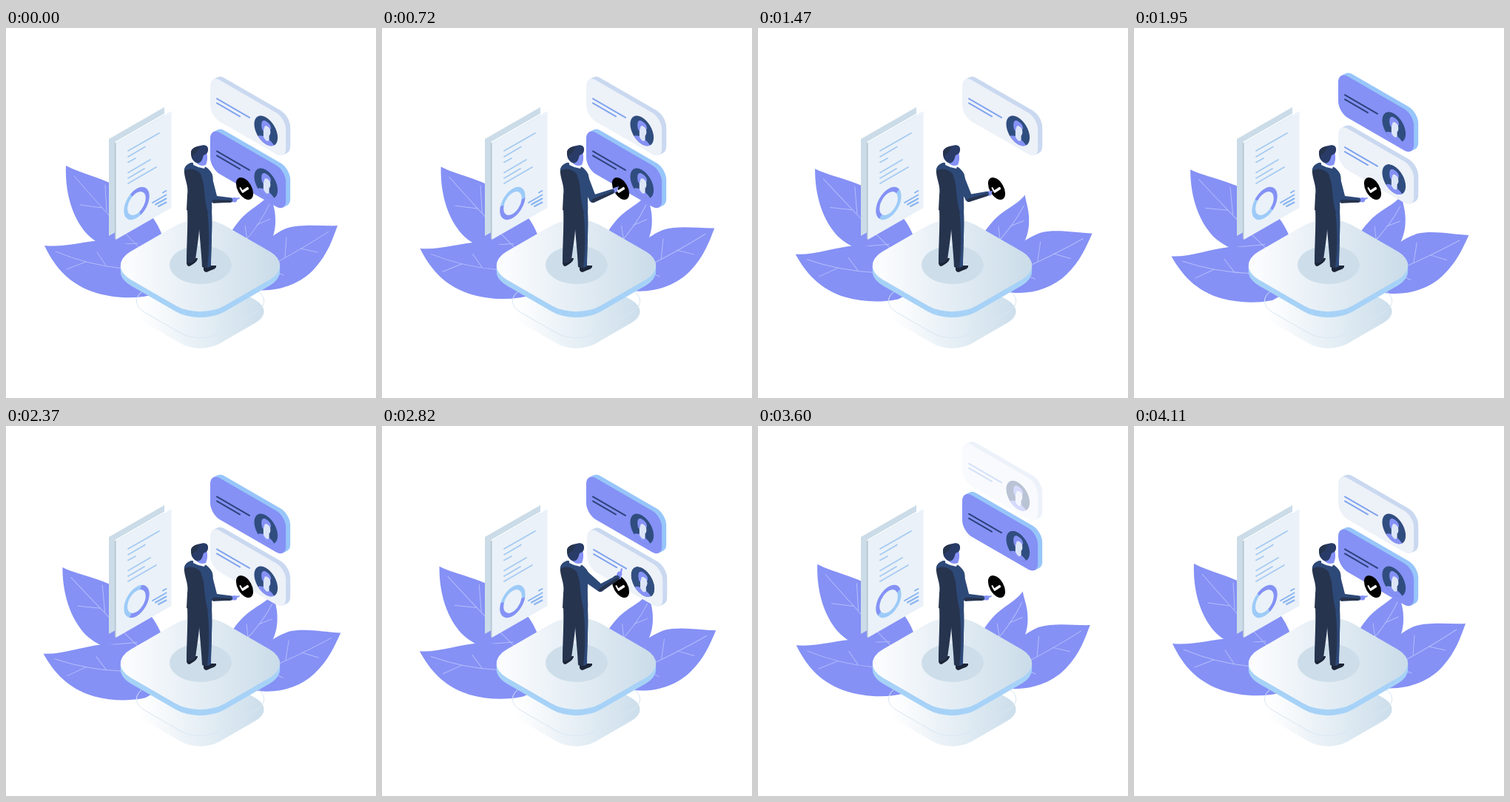
Write an HTML page with a canvas that moves like this. It is 500 px wide and 500 px high and loops after 4.14 s.

```html
<!DOCTYPE html>
<html lang="en">
<head>
<meta charset="utf-8">
<title>Profile choice</title>
<style>
html, body { margin: 0; width: 100%; height: 100%; overflow: hidden; background: #fff; }
canvas { display: block; width: 100vw; height: 100vh; }
</style>
</head>
<body>
<canvas id="stage"></canvas>
<script>
const LOOP = 4140, SWAP = 1857, COS = 0.866;
const PURPLE = '#8591f5', NAVY = '#27344e', BLUE = '#2d4978', SKY = '#a7d2f7';
const canvas = document.getElementById('stage');
const dpr = Math.max(1, window.devicePixelRatio || 1);
canvas.width = canvas.height = 500 * dpr;
const ctx = canvas.getContext('2d');

const ramp = (t, a, b) => Math.min(1, Math.max(0, (t - a) / (b - a)));
const ease = (t, a, b) => { const u = ramp(t, a, b); return u * u * (3 - 2 * u); };

function fill(c, d, color) {
  c.fillStyle = color;
  c.fill(new Path2D(d));
}
function stroke(c, d, color, width) {
  c.strokeStyle = color;
  c.lineWidth = width;
  c.lineCap = c.lineJoin = 'round';
  c.stroke(new Path2D(d));
}
function oval(c, x, y, rx, ry, color) {
  c.fillStyle = color;
  c.beginPath();
  c.ellipse(x, y, rx, ry, 0, 0, 7);
  c.fill();
}
// Draws on an upright isometric plane; dir sets which way it slopes.
function onWall(c, x, y, dir, draw) {
  c.save();
  c.transform(COS, dir * 0.5, 0, 1, x, y);
  draw();
  c.restore();
}

// Leaves: outline, veins, pivot and swing in radians
const leaves = [
  { x: 220, y: 320, swing: -0.037,
    shape: 'M81 186C105 199 140 203 172 228C197 249 212 272 216 300L180 312C150 303 117 293 102 269C85 244 80 213 81 186Z',
    veins: 'M92 200Q112 223 130 243Q155 272 182 299M100 239L130 243M140 293L178 291M134 212L136 248' },
  { x: 250, y: 322, swing: -0.073,
    shape: 'M52 294C78 297 104 288 132 287C160 287 190 300 214 324L204 359C178 367 145 366 116 356C81 343 64 319 52 294Z',
    veins: 'M67 302Q110 320 158 325M123 303L135 321M82 326L108 316' },
  { x: 300, y: 312, swing: 0.052,
    shape: 'M357 223C347 238 328 244 314 262C304 274 297 287 294 304L340 318C356 296 365 280 364 258C364 244 359 234 357 223Z',
    veins: 'M356 238Q343 266 318 294M323 267L326 286M339 266L357 258' },
  { x: 298, y: 325, swing: 0.086,
    shape: 'M448 267C426 268 400 264 378 271C352 283 336 302 322 322L336 354C368 357 398 346 417 325C435 305 441 286 448 267Z',
    veins: 'M436 275Q401 298 360 320M398 298L421 303M379 283L377 310M358 327L375 334' }
];
function drawLeaves(t) {
  const sway = (1 - Math.cos(2 * Math.PI * t / LOOP)) / 2;
  for (const leaf of leaves) {
    ctx.save();
    ctx.translate(leaf.x, leaf.y);
    ctx.rotate(leaf.swing * sway);
    ctx.translate(-leaf.x, -leaf.y);
    fill(ctx, leaf.shape, PURPLE);
    stroke(ctx, leaf.veins, '#b3bdfa', 1);
    ctx.restore();
  }
}

function tile(y, half, radius) {
  ctx.save();
  ctx.transform(COS, 0.5, -COS, 0.5, 262.5, y);
  ctx.beginPath();
  ctx.roundRect(-half, -half, 2 * half, 2 * half, radius);
  ctx.restore();
}
function shade(x0, x1, a, b) {
  const g = ctx.createLinearGradient(x0, 0, x1, 0);
  g.addColorStop(0, a);
  g.addColorStop(1, b);
  return g;
}
function drawPlatform() {
  tile(383, 58.5, 30);
  ctx.fillStyle = shade(180, 349, '#ffffff', '#ccdeeb');
  ctx.fill();
  tile(369, 58.5, 30);
  ctx.strokeStyle = '#d9e7f4';
  ctx.lineWidth = 1;
  ctx.stroke();
  ctx.fillStyle = SKY;
  for (let y = 329; y > 321; y--) {
    tile(y, 73.3, 38);
    ctx.fill();
  }
  tile(321, 73.3, 38);
  ctx.fillStyle = shade(165, 370, '#fbfcfe', '#cadce9');
  ctx.fill();
  oval(ctx, 263, 320, 42, 26, '#cddeea');
}

function drawPaper(t) {
  fill(ctx, 'M139 150L214 107V238L139 281Z', '#cbdce8');
  fill(ctx, 'M147 154L149 155V286L147 284.5Z', '#b3c2cf');
  fill(ctx, 'M148.5 155.5L223.5 112.5V243L148.5 286Z', '#eaf1f8');
  stroke(ctx, 'M148 154.5L222 112', '#fbfdff', 1.5);
  stroke(ctx, 'M165 166L207 142M165 174L188 160.5M165 181.5L175 176M165 195.5L195 178M165 203L187 190M165 210L203 188', '#a5caf3', 1.7);
  stroke(ctx, 'M212 222.5L216.5 220M198 236L216.5 225.5M202 238.5L216.5 230.5M206 241L216.5 235.5', '#88b4f0', 2);
  onWall(ctx, 176.5, 237, -1, () => {
    const mid = -0.42 + 4 * Math.PI * t / LOOP, span = 1.66;
    ctx.lineCap = 'butt';
    ctx.lineWidth = 5.5;
    for (const [a, b, color] of [[0, 7, '#9dcbf8'], [mid - span, mid + span, PURPLE]]) {
      ctx.beginPath();
      ctx.arc(0, 0, 17, a, b);
      ctx.strokeStyle = color;
      ctx.stroke();
    }
  });
}

// Cards are painted once, then moved and faded as a whole.
const CARD = { x: 272, y: 60, w: 116, h: 120, scale: 2 * dpr };
function makeCard(face, side, ink) {
  const layer = document.createElement('canvas');
  layer.width = CARD.w * CARD.scale;
  layer.height = CARD.h * CARD.scale;
  const c = layer.getContext('2d');
  c.scale(CARD.scale, CARD.scale);
  c.translate(-CARD.x, -CARD.y);
  const panel = (d, color) => onWall(c, 276 + d, 63 - d / 2, 1, () => {
    c.beginPath();
    c.roundRect(0, 0, 118, 56, 15);
    c.fillStyle = color;
    c.fill();
  });
  for (let d = 6; d > 0; d -= 0.5) panel(d, side);
  panel(0, face);
  stroke(c, 'M285 95.5L329 121M285 101.5L316 119.5', ink, 2);
  onWall(c, 351.3, 139, 1, () => {
    c.beginPath();
    c.arc(0, 0, 18.3, 0, 7);
    c.fillStyle = '#304d80';
    c.fill();
    c.clip();
    oval(c, 0, 20, 16, 11, PURPLE);
    fill(c, 'M-4 0H5V10Q1 16 -4 10Z', '#dbe5f7');
    oval(c, 1, -2, 6, 8, '#dbe5f7');
    fill(c, 'M-6 1C-9 -8 -5 -14 1 -13C7 -13 9 -9 7 -5C4 -8 0 -8 -2 -5L-4 2Z', PURPLE);
  });
  return layer;
}
const white = makeCard('#edf1f8', '#cad9f0', '#81a5ee');
const violet = makeCard(PURPLE, '#98c6fa', '#2c437c');

function putCard(card, dx, dy, alpha) {
  ctx.globalAlpha = alpha;
  ctx.drawImage(card, CARD.x + dx, CARD.y + dy, CARD.w, CARD.h);
  ctx.globalAlpha = 1;
}
function drawCards(t) {
  const first = t < 2030;
  const q = first ? t : t - SWAP;
  const [top, low] = first ? [white, violet] : [violet, white];
  const out = ease(q, 935, 1480);
  const dx = (first ? -140 : 140) * out;
  if (out < 1) putCard(low, dx, 71 + dx * 0.58, (1 - out) ** 1.5);
  putCard(top, 0, 71 * ease(q, 1568, 2028), 1);
  if (q > 1683) putCard(low, 0, -46 * (1 - ease(q, 1713, 2013)), ramp(q, 1683, 1863));
}

function drawBadge() {
  onWall(ctx, 322.5, 217, 1, () => {
    oval(ctx, 0, 0, 13.4, 13.4, '#000');
    stroke(ctx, 'M-6.5 3L-3.5 6L5 -3', '#fff', 3);
  });
}

// Arm poses: elbow, wrist and fingertip
const REST = [281, 231.5, 303, 232.5, 315, 230];
const TAP = [285, 231, 311, 221, 319, 215];
const LEFT = [285, 230, 309, 224, 316, 221];
const LIFT = [295, 219, 318, 205, 324, 193];
const poses = [[0, REST], [420, REST], [700, TAP], [1000, TAP], [1300, LEFT], [1480, LEFT], [1760, REST],
  [2420, REST], [2790, LIFT], [2900, LIFT], [3150, TAP], [3500, REST], [LOOP, REST]];
function armAt(t) {
  let i = 0;
  while (t >= poses[i + 1][0]) i++;
  const [a, from] = poses[i], [b, to] = poses[i + 1];
  const p = ease(t, a, b);
  return from.map((v, k) => v + (to[k] - v) * p);
}
function limb(x0, y0, r0, x1, y1, r1, color) {
  const a = Math.atan2(y1 - y0, x1 - x0) + Math.PI / 2;
  ctx.beginPath();
  ctx.arc(x0, y0, r0, a, a + Math.PI);
  ctx.arc(x1, y1, r1, a + Math.PI, a);
  ctx.fillStyle = color;
  ctx.fill();
}
function drawArm(t) {
  const [ex, ey, wx, wy, fx, fy] = armAt(t);
  limb(wx, wy, 2.5, wx + (fx - wx) * 0.5, wy + (fy - wy) * 0.5 + 1, 3.3, PURPLE);
  limb(wx + 3, wy, 2, fx, fy, 0.9, PURPLE);
  limb(271, 200, 7, ex, ey, 5, BLUE);
  limb(ex, ey, 5, wx, wy, 3.2, BLUE);
  limb(ex, ey + 2.6, 2.3, wx, wy + 1.6, 1.6, NAVY);
}

function drawMan() {
  fill(ctx, 'M244 317Q244 322 248 322L253 319Q259 315 259 311L255 311Z', '#1c2538');
  fill(ctx, 'M267 323Q266 330 271 330L278 327Q285 325 284 321L276 321Z', '#1c2538');
  fill(ctx, 'M245 244L263 246C262 272 259 292 256 313Q250 319 244 317C244 292 246 270 245 244Z', NAVY);
  fill(ctx, 'M260 246L278 246C279 274 277 300 277 322Q271 326 265 323C264 298 260 272 260 246Z', NAVY);
  fill(ctx, 'M272 248L278 246C279 274 277 300 277 322L272 324C275 298 275 272 272 248Z', BLUE);
  fill(ctx, 'M251 182C244 184 240 188 241 196C242 206 247 214 245 226L244 246Q253 250 262 250Q271 251 278 249C279 234 276 222 279 207C281 198 276 192 270 188Z', NAVY);
  fill(ctx, 'M251 182C244 184 241 188 241 193C249 188 259 191 264 199C269 211 267 230 273 250L278 249C279 234 276 222 279 207C281 198 276 192 270 188Z', BLUE);
  fill(ctx, 'M253 182L257 178L270 185L268 190Q260 189 253 185Z', '#f4f8fd');
  fill(ctx, 'M258 171L271 168C273 174 272 181 270 185Q263 188 257 182Z', PURPLE);
  fill(ctx, 'M250 170C249 163 256 160 263 159C269 157 274 160 273 165C273 169 270 171 267 172L265 178C262 184 257 183 254 180Q250 176 250 170Z', '#293c68');
  fill(ctx, 'M250 170C249 163 256 160 263 160C258 165 260 168 255 170Q251 173 252 177Z', NAVY);
}

function frame() {
  const t = performance.now() % LOOP;
  ctx.setTransform(dpr, 0, 0, dpr, 0, 0);
  ctx.fillStyle = '#fff';
  ctx.fillRect(0, 0, 500, 500);
  drawLeaves(t);
  drawPlatform();
  drawCards(t);
  drawPaper(t);
  drawMan();
  drawBadge();
  drawArm(t);
  requestAnimationFrame(frame);
}
frame();
</script>
</body>
</html>
```
